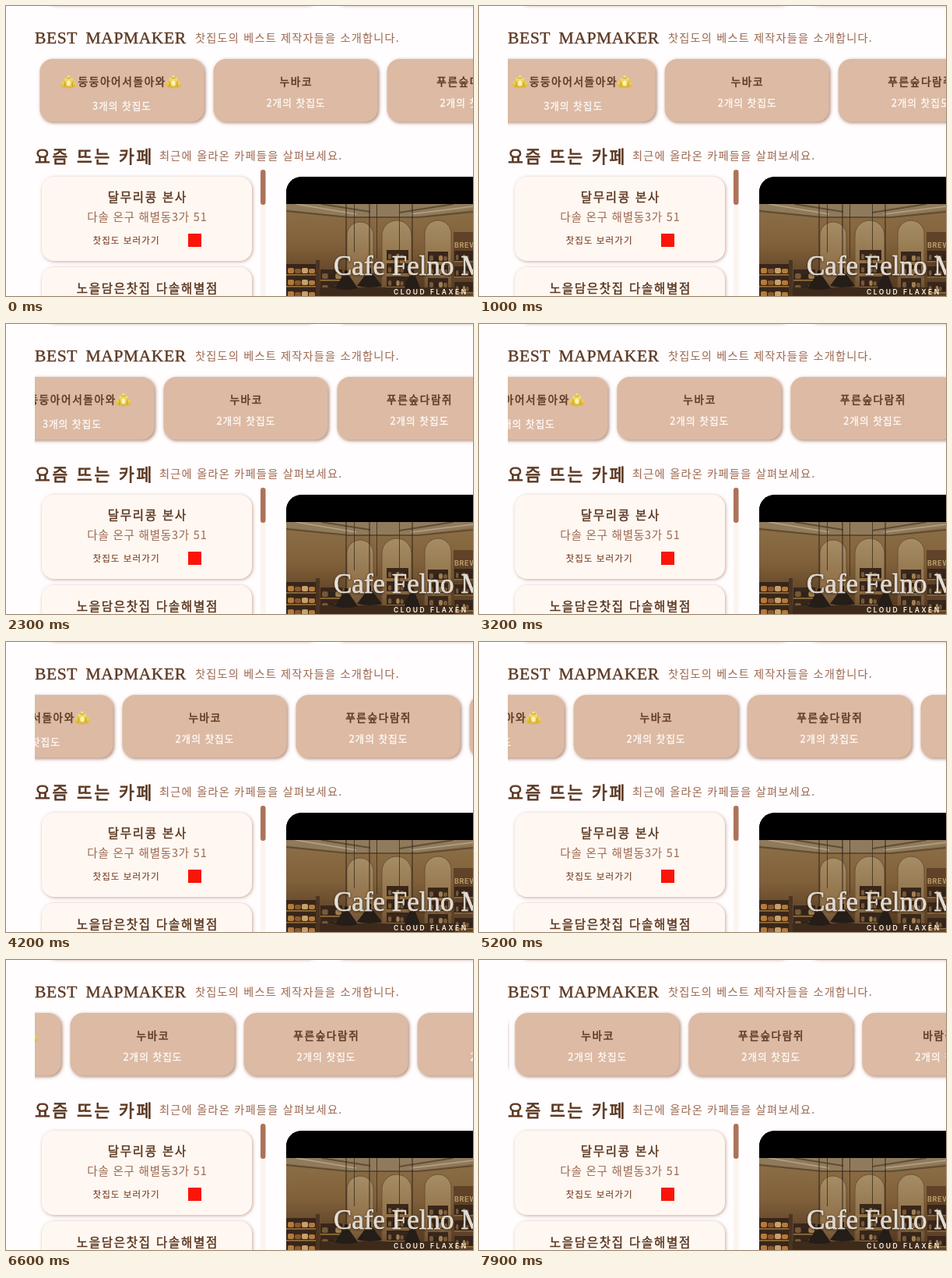
An HTML page that plays this animation: 600 px wide and 372 px high, repeating every 8 s.

```html
<!DOCTYPE html>
<html lang="ko">
<head>
<meta charset="utf-8">
<title>Best Mapmaker</title>
<style>
  html, body { margin: 0; width: 100%; height: 100%; overflow: hidden; background: #fffdfe; }
  svg { display: block; width: 600px; height: 372px; }
  text { font-family: "Noto Sans CJK KR", "Noto Sans CJK", "Noto Sans", sans-serif; white-space: pre; }
  .serif { font-family: "Liberation Serif", "Noto Serif", serif; }
  .latin { font-family: Inter, "Open Sans", sans-serif; }
</style>
</head>
<body>
<svg id="stage" viewBox="0 0 600 372" xmlns="http://www.w3.org/2000/svg">
  <defs>
    <filter id="cardShadow" x="-10%" y="-15%" width="120%" height="135%">
      <feDropShadow dx="1.5" dy="1.5" stdDeviation="2.2" flood-color="#8a5238" flood-opacity=".75"/>
    </filter>
    <filter id="softShadow" x="-10%" y="-15%" width="120%" height="135%">
      <feDropShadow dx="1" dy="1" stdDeviation="2.2" flood-color="#a06a4c" flood-opacity=".6"/>
    </filter>
    <filter id="blur"><feGaussianBlur stdDeviation=".7"/></filter>
    <linearGradient id="gold" x2="0" y2="1">
      <stop offset="0" stop-color="#f3e08c"/><stop offset=".55" stop-color="#efd04c"/><stop offset="1" stop-color="#dcb23a"/>
    </linearGradient>
    <linearGradient id="wall" x2="0" y2="1">
      <stop offset="0" stop-color="#8d7048"/><stop offset=".45" stop-color="#80603a"/><stop offset="1" stop-color="#4b321d"/>
    </linearGradient>
    <linearGradient id="niche" x2="0" y2="1">
      <stop offset="0" stop-color="#a58d66"/><stop offset=".6" stop-color="#907048"/><stop offset="1" stop-color="#60452a"/>
    </linearGradient>
    <clipPath id="carouselClip"><rect x="37" y="55" width="563" height="110"/></clipPath>
    <clipPath id="videoClip"><rect x="360" y="219" width="300" height="220" rx="20"/></clipPath>
    <g id="crown">
      <path d="M0 11 Q1 7 4 8 Q3 3 6.500 3 Q9.500 -2.500 12.500 3 Q16 3 15 8 Q18 7 19 11 Q20 16 15 16 Q9.500 18 4 16 Q-1 16 0 11Z" fill="url(#gold)"/>
      <path d="M4 8 Q6 11 4 15 M15 8 Q13 11 15 15 M6.500 3 Q9.500 6 12.500 3" fill="none" stroke="#b8913a" stroke-width=".9"/>
      <ellipse cx="9.500" cy="10.500" rx="2.500" ry="3.500" fill="#fff3b4"/>
    </g>
  </defs>
  <g id="page"></g>
  <g clip-path="url(#carouselClip)"><g id="track"></g></g>
  <g id="video" clip-path="url(#videoClip)"></g>
</svg>
<script>
const LOOP = 8000, STEP = 100, PITCH = 223;
const DARK = '#5c3822', MID = '#a27059';
const byId = id => document.getElementById(id);

const rect = (x, y, w, h, fill, rx = 0, extra = '') =>
  `<rect x="${x}" y="${y}" width="${w}" height="${h}" rx="${rx}" fill="${fill}" ${extra}/>`;
const path = (d, fill, extra = '') => `<path d="${d}" fill="${fill}" ${extra}/>`;
const label = (x, y, str, size, fill, spacing = 0, bold = 0, extra = '') =>
  `<text x="${x}" y="${y}" font-size="${size}" fill="${fill}" letter-spacing="${spacing}"
    stroke="${fill}" stroke-width="${bold}" ${extra}>${str}</text>`;
const centered = (x, y, str, size, fill, spacing, bold) =>
  label(x + spacing / 2, y, str, size, fill, spacing, bold, 'text-anchor="middle"');
const repeat = (n, draw) => Array.from({ length: n }, (_, i) => draw(i)).join('');

function drawPage() {
  const soft = 'filter="url(#softShadow)"';
  return [
    rect(50, -60, 350, 58.5, '#fff8f2', 14, soft),
    rect(422, -60, 350, 58.5, '#fff8f2', 14, soft),
    label(37, 48, 'BEST MAPMAKER', 21.5, DARK, 0.6, 0.4, 'class="serif" word-spacing="5"'),
    label(243, 46, '찻집도의 베스트 제작자들을 소개합니다.', 14.2, MID, 1.2, 0.1),
    label(37, 200.5, '요즘 뜨는 카페', 21.5, DARK, 2.8, 0.8),
    label(197, 197, '최근에 올라온 카페들을 살펴보세요.', 14.2, MID, 1.25, 0.1),
    rect(46, 219, 270, 108, '#fff8f2', 16, soft),
    rect(46, 335, 270, 108, '#fff8f2', 16, soft),
    centered(181, 251, '달무리콩 본사', 15.5, DARK, 1.8, 0.5),
    centered(181, 276, '다솔 온구 해별동3가 51', 14.5, MID, 0.8, 0.1),
    centered(154, 305, '찻집도 보러가기', 11.5, '#7b3d23', 1.1, 0.15),
    rect(234, 292, 17, 17, '#fb1509'),
    centered(181, 368, '노을담은찻집 다솔해별점', 15.5, DARK, 1.75, 0.5),
    rect(327, 210, 6.5, 180, '#fcf4ef', 3.2),
    rect(327, 210, 6.5, 45, '#ad735a', 3.2)
  ].join('');
}

function drawCard({ name, count, crowned }, i) {
  const x = 43.5 + i * PITCH, mid = x + (crowned ? 105 : 105.5);
  const crown = dx => `<use href="#crown" x="${mid + dx}" y="88.5"/>`;
  return rect(x, 68, 211, 80.3, '#dcbaa4', 16, 'filter="url(#cardShadow)"') +
    centered(mid, 102, name, 13.7, DARK, 1.6, 0.5) +
    centered(mid, crowned ? 132.5 : 129, `${count}개의 찻집도`, 12.7, '#fffaf6', 1, 0.3) +
    (crowned ? crown(-77.5) + crown(57) : '');
}

function drawNiche(x, w, top) {
  const r = w / 2;
  return path(`M${x} 372V${top + r}A${r} ${r} 0 0 1 ${x + w} ${top + r}V372Z`, 'url(#niche)', 'stroke="#6b5032"');
}

function drawShelf(x, y, w, n, colors) {
  return rect(x, y, w, 13, '#38261a') +
    repeat(n, i => rect(x + 2 + i * (w - 2) / n, y + 5 + i % 2, (w - 2) / n - 1, 7 - i % 2, colors[i % colors.length], 2)) +
    rect(x, y + 13, w, 1.5, '#94703f');
}

function drawLamp(x, y, r) {
  return rect(x - 0.5, 254, 1, y - 254, '#2e241b') +
    rect(x - 2, y - 7, 4, 8, '#221b16') +
    path(`M${x - 4} ${y}H${x + 4}L${x + r} ${y + 16}Q${x} ${y + 20} ${x - r} ${y + 16}Z`, '#241d18');
}

function drawVideo() {
  const breads = ['#b57a3a', '#8a582d', '#c8a06a'];
  const jars = ['#75583a', '#2f231a', '#a08052'];
  const photo = [
    rect(360, 254, 240, 118, 'url(#wall)'),
    path('M360 254H600V261L530 270H440L360 261Z', '#8f7a5c'),
    path('M360 263L440 271H530L600 264', 'none', 'stroke="#5f4b32" stroke-width="2"'),
    path('M372 254L450 267M600 257L520 267', 'none', 'stroke="#b5a484" stroke-width="1.5"'),
    path('M405 254L468 264M575 254L505 265', 'none', 'stroke="#604d36" stroke-width="2"'),
    drawNiche(438, 34, 277), drawNiche(483, 38, 275), drawNiche(538, 34, 275),
    rect(575, 290, 25, 82, '#5f4227'),
    label(576, 310, 'BREW', 9, '#b99b69', 0.6, 0, 'class="latin" font-weight="700"'),
    repeat(3, i => drawShelf(576, 314 + i * 20, 24, 5, jars)),
    repeat(3, i => drawShelf(360, 331 + i * 15, 38, 4, breads)),
    repeat(3, i => drawShelf(404, 338 + i * 15, 28, 3, jars)),
    repeat(3, i => drawShelf(489, 313 + i * 17, 28, 5, jars)),
    repeat(3, i => drawShelf(542, 315 + i * 17, 26, 4, jars)),
    rect(398, 326, 5, 46, '#4b3421'),
    rect(403, 361, 174, 11, '#3e2a1a'),
    repeat(3, i => rect(447 + i * 29, 254, 0.8, 62 + i * 8, '#3a2c20')),
    drawLamp(437, 346, 15), drawLamp(467, 343, 16), drawLamp(522, 346, 10)
  ].join('');
  return rect(360, 219, 240, 153, '#000') +
    `<g filter="url(#blur)">${photo}</g>` + rect(360, 219, 240, 35, '#000') +
    label(421, 345, 'Cafe Felno M', 35, '#fffdf8', 0, 0.5,
      'class="serif" style="text-shadow:0 1px 3px #3d2815"') +
    label(498, 370, 'CLOUD FLAXEN', 8.5, '#fffaf0', 2.5, 0, 'class="latin" font-weight="600"');
}

const makers = [
  { name: '둥둥아어서돌아와', count: 3, crowned: true },
  { name: '누바코', count: 2 },
  { name: '푸른숲다람쥐', count: 2 },
  { name: '바람결이', count: 2 }
];

byId('page').innerHTML = drawPage();
byId('track').innerHTML = makers.map(drawCard).join('');
byId('video').innerHTML = drawVideo();

const track = byId('track');
const start = performance.now();

function render(time) {
  const step = Math.floor((time % LOOP) / STEP);
  track.setAttribute('transform', `translate(${-step * STEP * PITCH / LOOP} 0)`);
}

function tick() {
  render(performance.now() - start);
  requestAnimationFrame(tick);
}
tick();
</script>
</body>
</html>
```
